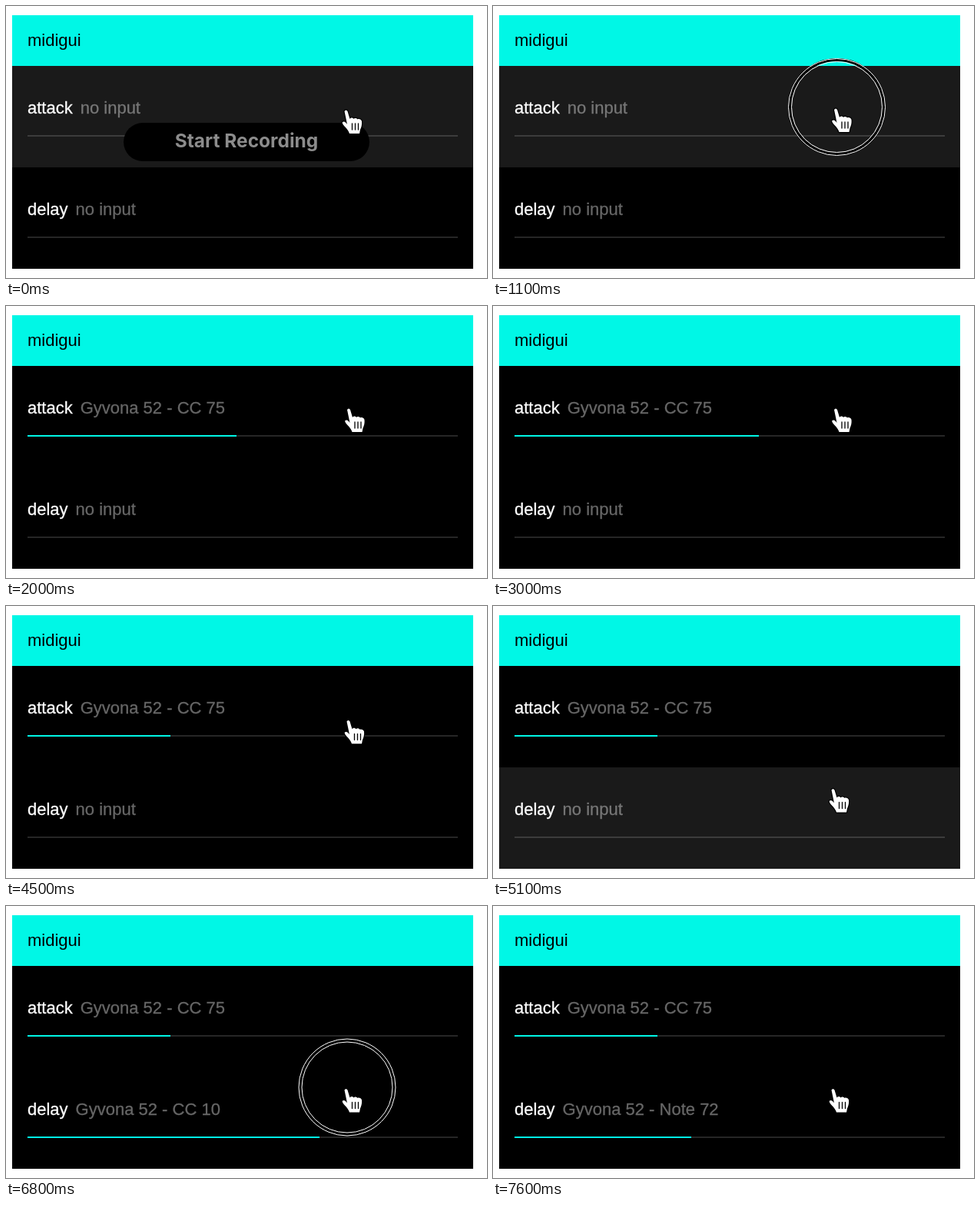
Animation, 626 px wide and 354 px high, one loop 8000 ms. Source, as an HTML page:

```html
<!DOCTYPE html>
<html lang="en">
<head>
<meta charset="utf-8">
<title>midigui</title>
<style>
  html, body { margin: 0; width: 100%; height: 100%; overflow: hidden; background: #fff; }
  svg { display: block; width: 100vw; height: 100vh; }
  text { font: 22px "Liberation Sans", Arial, sans-serif; }
  .row text { fill: #fff; stroke: #fff; stroke-width: .3px; }
  .row .input { opacity: .4; }
  .track { fill: #fff; opacity: .15; }
  .cyan { fill: #00f7e6; }
  #pill text { font: 700 24.5px Inter, sans-serif; fill: #8c8c8c; text-anchor: middle; }
</style>
</head>
<body>
<svg viewBox="0 0 626 354">
  <rect class="cyan" x="8" y="12" width="600" height="66"/>
  <text x="28" y="52">midigui</text>
  <g id="rows"></g>
  <g id="pill">
    <rect x="153" y="152" width="320" height="50" rx="25"/>
    <text x="313" y="184">Start Recording</text>
  </g>
  <g id="ring" fill="none">
    <circle r="61.5" stroke="#000" stroke-width="4"/>
    <circle r="63" stroke="#fff"/>
    <circle r="59" stroke="#fff"/>
  </g>
  <g id="hand" stroke-linejoin="round" stroke-linecap="round">
    <path fill="#fff" stroke="#000" stroke-width="2.4" paint-order="stroke"
      d="M-2 1q2-3 4 0L5 11c1-2 4-2 5 0c1-1.5 4-1.5 5 .5c1.5-1 5 0 5.5 2.5c.5 4-.5 8-2 11l-1 5h-13c-1-3-3-6-6-9c-2-2-4-5-3-6c2-1.5 4 0 6 3z"/>
    <path fill="none" stroke="#000" stroke-width="1.3" d="M8 17v8M12 17v8M16 17v8"/>
  </g>
</svg>
<script>
const LOOP = 8000, STEP = 100;
const BLACK = '#000', HOVER = '#1a1a1a', RED = '#e13535';
const DEVICE = 'Gyvona 52 - ';
const $ = id => document.getElementById(id);

function makeRow(name, y, inputX) {
  const g = document.createElementNS('http://www.w3.org/2000/svg', 'g');
  g.setAttribute('class', 'row');
  g.setAttribute('transform', `translate(0 ${y})`);
  g.innerHTML = `<rect x="8" width="600" height="132"/>
    <text x="28" y="62">${name}</text>
    <text class="input" x="${inputX}" y="62"></text>
    <rect class="track" x="28" y="90" width="560" height="2"/>
    <rect class="cyan" x="28" y="90" height="2"/>`;
  $('rows').append(g);
  const [back, , input, , bar] = g.children;
  return (color, text, end) => {
    back.setAttribute('fill', color);
    input.textContent = text;
    bar.setAttribute('width', end - 28);
  };
}

// Last value whose start time has passed
const hold = (keys, t) => keys.reduce((v, [at, next]) => t >= at ? next : v, keys[0][1]);

// Smooth path through [time, value] points
function glide(keys, t) {
  const i = keys.findIndex(k => k[0] > t);
  if (i < 0) return keys[keys.length - 1][1];
  if (i === 0) return keys[0][1];
  const [t0, a] = keys[i - 1], [t1, b] = keys[i];
  const p = (t - t0) / (t1 - t0);
  return a + (b - a) * (1 - Math.cos(Math.PI * p)) / 2;
}

const attack = makeRow('attack', 78, 96.7);
const delay = makeRow('delay', 210, 90.6);

const attackColor = [[0, HOVER], [1300, RED], [1900, BLACK]];
const attackText = [[0, 'no input'], [1900, DEVICE + 'CC 75']];
const attackKnob = [[2400, 300], [2700, 588], [3000, 346], [3300, 64], [3700, 320], [4200, 214]];
const delayColor = [[0, BLACK], [4700, HOVER], [5200, RED], [5400, BLACK], [7000, RED], [7500, BLACK]];
const delayText = [[0, 'no input'], [5400, DEVICE + 'CC 10'], [7500, DEVICE + 'Note 72']];
const delayKnob = [[5500, 218], [5900, 90], [6300, 504], [6600, 408]];
const clicks = [1100, 5000, 6800];

function draw(t) {
  attack(hold(attackColor, t), hold(attackText, t), t < 1900 ? 28 : glide(attackKnob, t));
  delay(hold(delayColor, t), hold(delayText, t),
    t < 5400 ? 28 : t < 7500 ? glide(delayKnob, t) : 258);

  const x = t < 4400 ? hold([[0, 442.5], [800, 446], [1500, 448], [1600, 446]], t)
    : glide([[4400, 446], [4800, 442.5]], t);
  const y = t < 4400 ? hold([[0, 136], [800, 134]], t)
    : glide([[4400, 134], [4800, 238.5]], t);
  $('hand').setAttribute('transform', `translate(${x} ${y})`);
  $('ring').setAttribute('transform', `translate(${x + 1.5} ${y - 2.5})`);
  $('ring').setAttribute('visibility', clicks.includes(t) ? 'visible' : 'hidden');
  $('pill').setAttribute('opacity', Math.max(0, 1 - t / 400));
}

const start = performance.now();
function tick() {
  const t = (performance.now() - start) % LOOP;
  draw(Math.floor(t / STEP) * STEP);
  requestAnimationFrame(tick);
}
tick();
</script>
</body>
</html>
```
